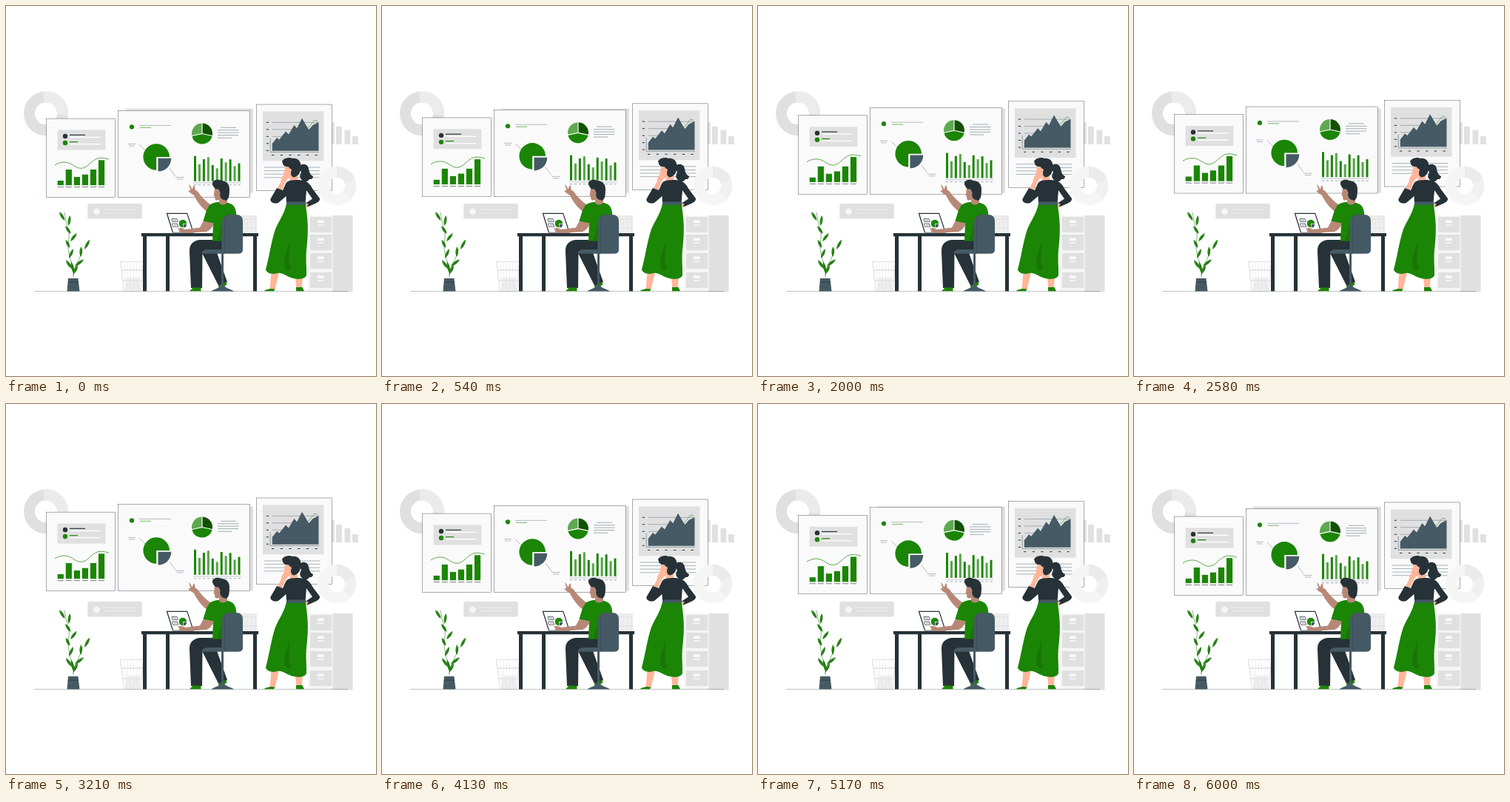
An HTML page with a canvas that plays this animation: 500x500 px, repeating every 6040 ms.

```html
<!DOCTYPE html>
<html lang="en">
<head>
<meta charset="utf-8">
<title>Office data presentation</title>
<style>
html, body { margin: 0; width: 100%; height: 100%; overflow: hidden; background: #fff; }
canvas { display: block; width: 100vw; height: 100vh; }
</style>
</head>
<body>
<canvas id="stage"></canvas>
<script>
const canvas = document.getElementById('stage');
const ctx = canvas.getContext('2d');
const LOOP = 6040, LIFT = 6.4;
const GREEN = '#1b8505', DARK = '#263238', SLATE = '#455a64', PAPER = '#fafafa';
const GREY = '#e0e0e0', PALE = '#ebebeb', SKIN = '#b78876', PEACH = '#ffb59a';

function fill(d, color) { ctx.fillStyle = color; ctx.fill(new Path2D(d)); }
function line(d, color, w) {
  ctx.strokeStyle = color; ctx.lineWidth = w; ctx.stroke(new Path2D(d));
}
function box(x, y, w, h, color, r = 0) {
  ctx.fillStyle = color; ctx.beginPath(); ctx.roundRect(x, y, w, h, r); ctx.fill();
}
function dot(x, y, r, color) {
  ctx.fillStyle = color; ctx.beginPath(); ctx.arc(x, y, r, 0, 7); ctx.fill();
}
function wedge(x, y, r, from, to, color) {
  ctx.fillStyle = color; ctx.beginPath(); ctx.moveTo(x, y);
  ctx.arc(x, y, r, from * Math.PI / 180, to * Math.PI / 180);
  ctx.closePath(); ctx.fill();
}
function ring(x, y, r, w, from, to, color) {
  ctx.strokeStyle = color; ctx.lineWidth = w; ctx.beginPath();
  ctx.arc(x, y, r, from * Math.PI / 180, to * Math.PI / 180); ctx.stroke();
}
function rule(x1, x2, y, color, w) { line(`M${x1} ${y}H${x2}`, color, w); }
function sheet(x, y, w, h) {
  box(x, y, w, h, PAPER);
  ctx.strokeStyle = DARK; ctx.lineWidth = 0.4; ctx.strokeRect(x, y, w, h);
}

function backdrop() {
  ring(54, 145.3, 22.5, 15, 0, 360, GREY);
  ring(54, 145.3, 22.5, 15, -98, 5, PALE);

  [[436, 157], [446, 163], [457.5, 168], [468, 176]].forEach(([x, y]) =>
    box(x, y, 7.8, 187 - y, GREY));

  box(161.5, 138.5, 172.5, 114, GREY);

  box(110.3, 267, 73.5, 20.6, GREY, 2);
  dot(122.3, 278, 4.4, '#f5f5f5');
  rule(133, 176, 275.2, '#f0f0f0', 0.8);
  rule(133, 176, 279.6, '#f0f0f0', 0.8);

  box(408, 283, 34, 102.5, '#f5f5f5');
  box(441.5, 283, 27, 103.5, GREY);
  [285, 309, 334, 360].forEach(y => {
    box(411, y, 29, 21, GREY);
    box(421, y + 4.5, 8.5, 3.6, '#fafafa');
    rule(421, 429.5, y + 11.3, '#fafafa', 1.4);
  });

  box(319, 283, 20, 24, PALE);
  [324, 329, 334].forEach(x => line(`M${x} 285V307`, '#fafafa', 0.8));
  rule(320, 339, 288, GREY, 1);
  rule(320, 339, 300, GREY, 1);

  fill('M162 367H181L181 384H161Z', '#f0f0f0');
  line('M154.5 345.5H186L181.5 385H159.5Z', GREY, 1.2);
  for (let i = 1; i < 7; i++) {
    line(`M${154.5 + i * 4.5} 345.5L${159.5 + i * 3.15} 385`, '#ebebeb', 0.7);
  }
  rule(156, 185, 357, GREY, 1.6);
  rule(157, 183.5, 371, GREY, 1.3);
  line('M163 384V376H168V382H173V373H178V384', GREY, 0.8);
}

function sideRing() {
  ring(447, 243, 18.7, 15, 0, 360, '#f5f5f5');
  ring(447, 243, 18.7, 15, -90, -20, PALE);
  ring(447, 243, 18.7, 15, -20, 45, '#f0f0f0');
}

function leftBoard() {
  sheet(54.5, 152.1, 93, 106.4);
  box(69.5, 167.5, 65, 27, GREY);
  dot(80, 176, 3.2, DARK);
  dot(80, 185, 3.2, GREEN);
  rule(86, 107, 174.3, DARK, 1.2);
  rule(86, 127.5, 177.4, '#fff', 1.3);
  rule(86, 97, 183.7, GREEN, 1.2);
  rule(86, 127.5, 186.7, '#fff', 1.3);
  line('M66 215C72 211 80 209.5 87 213C94 217 98 220.5 104 219C112 217 117 206 127 205.3C132 205 135 206 139 207.3', GREEN, 0.7);
  [236, 221, 231, 227.7, 221, 208.3].forEach((y, i) => {
    const x = 69.7 + i * 11.05;
    box(x, y, 8.2, 242.2 - y, GREEN);
    rule(x, x + 8.2, 244.6, DARK, 0.6);
  });
}

function midBoard() {
  sheet(151.5, 141.5, 178, 117);
  dot(170, 163.4, 3.1, GREEN);
  rule(180, 223, 161.4, SLATE, 0.4);
  rule(181, 196, 164.3, GREEN, 0.6);

  wedge(203.2, 204, 17.8, 90, 360, GREEN);
  wedge(205.5, 205.8, 17.8, 0, 90, SLATE);
  line('M180 187L188 195M221 219L229 230', SLATE, 0.4);
  rule(165, 175, 186.5, SLATE, 0.4);
  rule(166, 174, 189, SLATE, 0.4);
  rule(229, 241, 231.5, SLATE, 0.4);
  rule(231, 239.5, 234, SLATE, 0.4);

  wedge(265, 172.5, 14, 12, 168, GREEN);
  wedge(265, 172.5, 14, 168, 270, '#5fa852');
  wedge(265, 172.5, 14, 270, 372, '#115303');
  line('M265 158V172.5L251 175.5M265 172.5L279 175.5', PAPER, 1.2);
  rule(290, 311, 164.3, SLATE, 0.5);
  rule(286, 314.5, 167.8, SLATE, 0.5);
  rule(286, 314.5, 171.2, SLATE, 0.5);
  rule(286, 314, 174.6, SLATE, 0.5);
  rule(286, 305, 178.2, SLATE, 0.5);

  [202.8, 214, 207, 204.3, 215, 219.3, 206, 211.3, 207.3, 216.4, 212.6].forEach((y, i) => {
    const x = 254 + i * 5.95;
    box(x, y, 3, 236.8 - y, i % 2 ? '#56a548' : GREEN);
    rule(x, x + 3.2, 241.8, SLATE, 0.5);
  });
  rule(253, 318, 239, SLATE, 0.3);
}

function rightBoard() {
  sheet(338.5, 133, 102, 116.5);
  box(346.8, 142.5, 82.7, 66.8, GREY);
  [157.3, 166.8, 176.3, 185.8, 195.3].forEach((y, i) => {
    rule(351.8, 355, y, DARK, 1);
    if (i < 4) rule(360, 422, y, SLATE, 0.4);
  });
  line('M357.2 179V197.5H423', SLATE, 0.5);
  line('M360 191L370 181L381 183L391 170L400 173L409 164L417 154L421 155.5', GREEN, 0.5);
  fill('M359.8 195.7V186L366 178L369.3 180.5L378 169.5L382 173.5L389.4 161L393.2 165.3L400 151.7L409.3 167.3L414.5 161L422.5 157V195.7Z', SLATE);
  for (let i = 0; i < 6; i++) rule(359 + i * 11.7, 362.3 + i * 11.7, 201.5, DARK, 1);
  [218, 222.6, 227.2, 231.8].forEach(y => rule(349, 424.5, y, SLATE, 0.45));
}

function leaf(x, y, angle, len) {
  ctx.save();
  ctx.translate(x, y);
  ctx.rotate(angle * Math.PI / 180);
  const half = side =>
    `M0 0C${side * 2.8} ${-len * 0.35} ${side * 1.9} ${-len * 0.8} 0 ${-len}Z`;
  fill(half(-1), GREEN);
  fill(half(1), '#156c04');
  ctx.restore();
}

function plant() {
  line('M91 367C92 348 82 336 84 318C88 308 81 296 79 279M91 364C93 348 102 340 103 328', '#176f05', 0.5);
  [[79.5, 290, -32, 14], [84.5, 297, 8, 14], [87.5, 308, -34, 13], [87, 318, 38, 14],
   [86, 327, -25, 12], [85, 341, 25, 14], [89, 355, -35, 14], [92, 362, -14, 17],
   [101, 339, 2, 14], [106, 329, 28, 15], [93, 351.5, 53, 15], [91.5, 362, 24, 13]
  ].forEach(a => leaf(...a));
  fill('M84 368H97.5L99.5 385.5H82.5Z', SLATE);
  rule(83.7, 97.9, 373.2, DARK, 0.7);
}

function desk() {
  box(183, 307, 158, 4.2, DARK);
  [185, 216, 334].forEach(x => box(x, 311, 5, 74.4, DARK));
}

function laptop() {
  fill('M216.6 279.8H245.2L254 306.6H225Z', DARK);
  fill('M218.4 281H244.4L252.4 305.8H226Z', '#fff');
  line('M224 287.5H231L232 291.5H225ZM224.5 294H231.5L232.8 298.3H225.5Z', DARK, 0.7);
  line('M226 289.5H230M227 296H231M233 290L236 292M234 297L237 295', SLATE, 0.6);
  wedge(239, 294, 5.2, 90, 360, GREEN);
  wedge(239.6, 294.8, 4.8, 0, 90, SLATE);
}

function man() {
  // legs
  fill('M263 330L283 328L299 373L287.5 378.5Z', DARK);
  fill('M287 378L297.5 372.5L298.5 376C295 380 292 380 288 382Z', GREEN);
  fill('M300 316H262C252 317 247.5 323 248 332L250 381H265L265.5 334H300Z', DARK);
  fill('M252 380.5H263.5V385.3H248.5C249 383 252 383 252 380.5Z', GREEN);

  // raised arm
  fill('M253.5 251.5L258 249.5C263 257 269 263 277 269L276 280C266 276 258 264 253.5 255Z', SKIN);
  fill('M247 241.5C248.5 241.5 250 245 251.5 247.5L253.8 242.5C255.6 242 255 246 255.5 248L258 250.5L255 255.5C252 255 249.5 253.5 246 249.5L249.5 249Z', SKIN);

  // torso
  fill('M275 269C282 264 291 264 300 266C309 268 311 274 311.5 284L311 317.5H279L280 293L271 289Z', GREEN);
  fill('M293 292L285 317.5H294Z', '#187505');

  // resting arm
  fill('M268 288L282 291C280 297 277 303 271 305L242 307L233.5 305.5L234.5 303L232 301.5C235 299 239 300 242 302L262 299.5Z', SKIN);
  fill('M275 269C284 266 288 272 286 281L283 294L266.5 290.5L271 276Z', GREEN);

  // head
  fill('M282 246L281.2 253L280.5 256L282 257.3L282.5 261.5C284 263.3 286 262.5 288 262L288.5 267C293 270 297 268 299 266V252L290 244Z', SKIN);
  fill('M280 237C283 234 288 234.5 291 236C298 236 302.5 241 302 249C301.7 256 301.5 261 297.5 262.8C293 262 290 260 289.5 257L287.8 247.5C284.5 248.3 281 246.5 280 243C278.5 241.5 278.5 238.5 280 237Z', DARK);
  fill('M287.5 250C290 249.5 290.3 255 288 255.5Z', SKIN);
}

function chair() {
  fill('M264.5 333C266 329.5 270 329 275 329H293L295 334.7H266Z', SLATE);
  fill('M301 282H311C317 282 320 285 320 291V329C320 333 318 334.7 314 334.7H291.5V297C291.5 287 295 282 301 282Z', SLATE);
  line('M295.5 334V289Q297 283 302 282.3', '#37474f', 0.7);
  box(291, 334, 3, 46, SLATE);
  fill('M277 385.6C283 382 289 381 291 377H294C296 381 302 382 308.5 385.6Z', SLATE);
}

function woman() {
  // legs and shoes
  fill('M358.5 360H369L363.5 383H356.5Z', PEACH);
  fill('M390.5 364H401L399.8 381H392.5Z', PEACH);
  fill('M356.5 382L363.5 382.5L362 385.3H349C350 383 354 383.5 356.5 382Z', GREEN);
  fill('M392 380H400.5L403 385.3H392Z', GREEN);

  // hair tail
  fill('M396 217C400 211.5 408 213 409 220C410 226 412 229 415 230C415 233.5 412 234.5 410 234C408 238 402 238.5 400 235C396 232 397 228 399 225Z', DARK);

  // head
  fill('M378 215L376.5 222L375 226L377 227.3C377 231 380 232 384 231L383.5 238H394V222Z', PEACH);
  fill('M374.5 208C378 204.5 384 204.5 387 206C393 204.8 398.5 209 398.5 216C398.5 224 396 230 389 231.5C385 230.5 384.5 227 385.5 222L381.5 217C377 217.5 373.5 215 374 212C372.5 210.5 373 209 374.5 208Z', DARK);
  fill('M383 220C386 218.5 387 223 383.5 224.5Z', PEACH);

  // hand on chin
  fill('M364 252L371.5 237.5C371.5 233 374 229 377.5 226C379.5 226.5 379 228.5 378 230L382.5 229.5C384 231 383 232.5 380.5 233.5L377 239L371 253Z', PEACH);

  // blouse
  fill('M380 237.5C386 234.5 397 234.5 404 236.5C409 238 412 243 415 248L424 260C424.5 263 422 265 418 267L407.5 271.5L403.5 267.5L414 260.5L406 249L404.5 267H379L378.5 257L368 266C362 268 356.5 265 357.5 260.5L366 246L374 249L378 240Z', DARK);
  fill('M402.5 266.5L408.5 267L406.5 272.5L402 272Z', PEACH);

  // skirt
  fill('M379 267H404.5C408 287 409 303 406.5 325C404.5 341 406.5 352 406 364C404 369.5 394 370 386 367.5C376 364 372 359 365 361.5C358 363 351.5 360 351 356C356 338 358 320 363.5 303C369 289 376 282 379 267Z', GREEN);
  fill('M383.5 318C380 330 374 342 377 353C379 358 383 358 385.5 355C380 347 383 334 383.5 318Z', '#187505');
  box(379, 264.5, 26, 4.3, SLATE);
}

function draw(now) {
  const scale = devicePixelRatio || 1;
  const w = Math.round(innerWidth * scale), h = Math.round(innerHeight * scale);
  if (canvas.width !== w || canvas.height !== h) { canvas.width = w; canvas.height = h; }
  ctx.setTransform(w / 500, 0, 0, h / 500, 0, 0);
  ctx.fillStyle = '#fff';
  ctx.fillRect(0, 0, 500, 500);

  const phase = (now % LOOP) / LOOP;
  const lift = LIFT * (1 - Math.abs(1 - 2 * phase));

  backdrop();
  ctx.save();
  ctx.translate(0, -lift);
  leftBoard();
  midBoard();
  rightBoard();
  ctx.restore();

  sideRing();
  rule(38, 462, 385.5, DARK, 0.3);
  plant();
  desk();
  laptop();
  man();
  chair();
  woman();
  requestAnimationFrame(draw);
}
requestAnimationFrame(draw);
</script>
</body>
</html>
```
